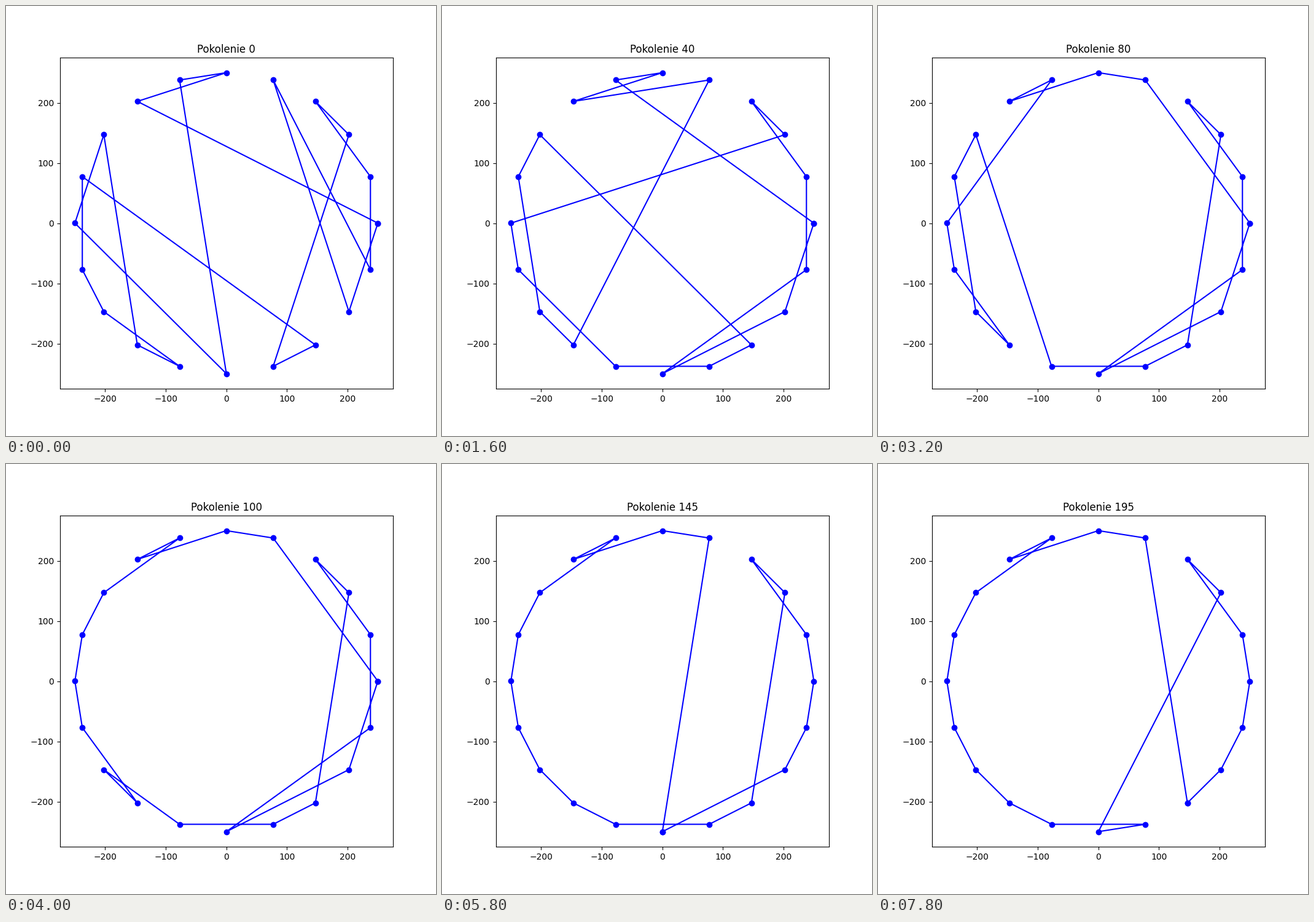
Recreate the animation shown at these times as a matplotlib script. Size 700x700 px, loop 8000 ms.

```python
import numpy as np
import matplotlib.pyplot as plt
from matplotlib.animation import FuncAnimation

CITIES = 20
RADIUS = 250
FRAMES = 40
INTERVAL = 200
GENERATIONS_PER_FRAME = 5

START = [0, 18, 4, 19, 1, 3, 2, 16, 17, 9,
         11, 12, 14, 13, 8, 10, 15, 6, 5, 7]


def swap(a, b):
    """Exchange two cities in the tour."""
    return lambda tour: [b if c == a else a if c == b else c for c in tour]


def move(cities, before):
    """Take some cities out and put them back in front of another one."""
    def apply(tour):
        rest = [c for c in tour if c not in cities]
        i = rest.index(before)
        return rest[:i] + cities + rest[i:]
    return apply


# (step at which the better tour is found, change to the tour)
MUTATIONS = [
    (1, move([8], 9)),
    (2, swap(6, 7)),
    (3, move([10, 11], 16)),
    (4, move([14], 16)),
    (7, swap(4, 15)),
    (9, swap(2, 6)),
    (13, swap(2, 4)),
    (13, swap(2, 6)),
    (14, move([17, 16, 14], 10)),
    (16, move([11, 10], 6)),
    (18, move([9, 8], 6)),
    (22, swap(12, 13)),
    (26, swap(0, 15)),
    (28, swap(0, 19)),
    (33, swap(15, 17)),
]


def tour_at(step):
    tour = START
    for when, mutate in MUTATIONS:
        if when <= step:
            tour = mutate(tour)
    return tour


angles = 2 * np.pi * np.arange(CITIES) / CITIES
xs, ys = RADIUS * np.cos(angles), RADIUS * np.sin(angles)


def closed_path(step):
    tour = tour_at(step)
    loop = tour + tour[:1]
    return xs[loop], ys[loop]


fig, ax = plt.subplots(figsize=(7, 7), dpi=100)
line, = ax.plot(*closed_path(0), "bo-")
title = ax.set_title("Pokolenie 0")


def update(step):
    line.set_data(*closed_path(step))
    title.set_text(f"Pokolenie {step * GENERATIONS_PER_FRAME}")
    return line, title


anim = FuncAnimation(fig, update, frames=FRAMES, interval=INTERVAL,
                     repeat=True, repeat_delay=0)
plt.show()
```
